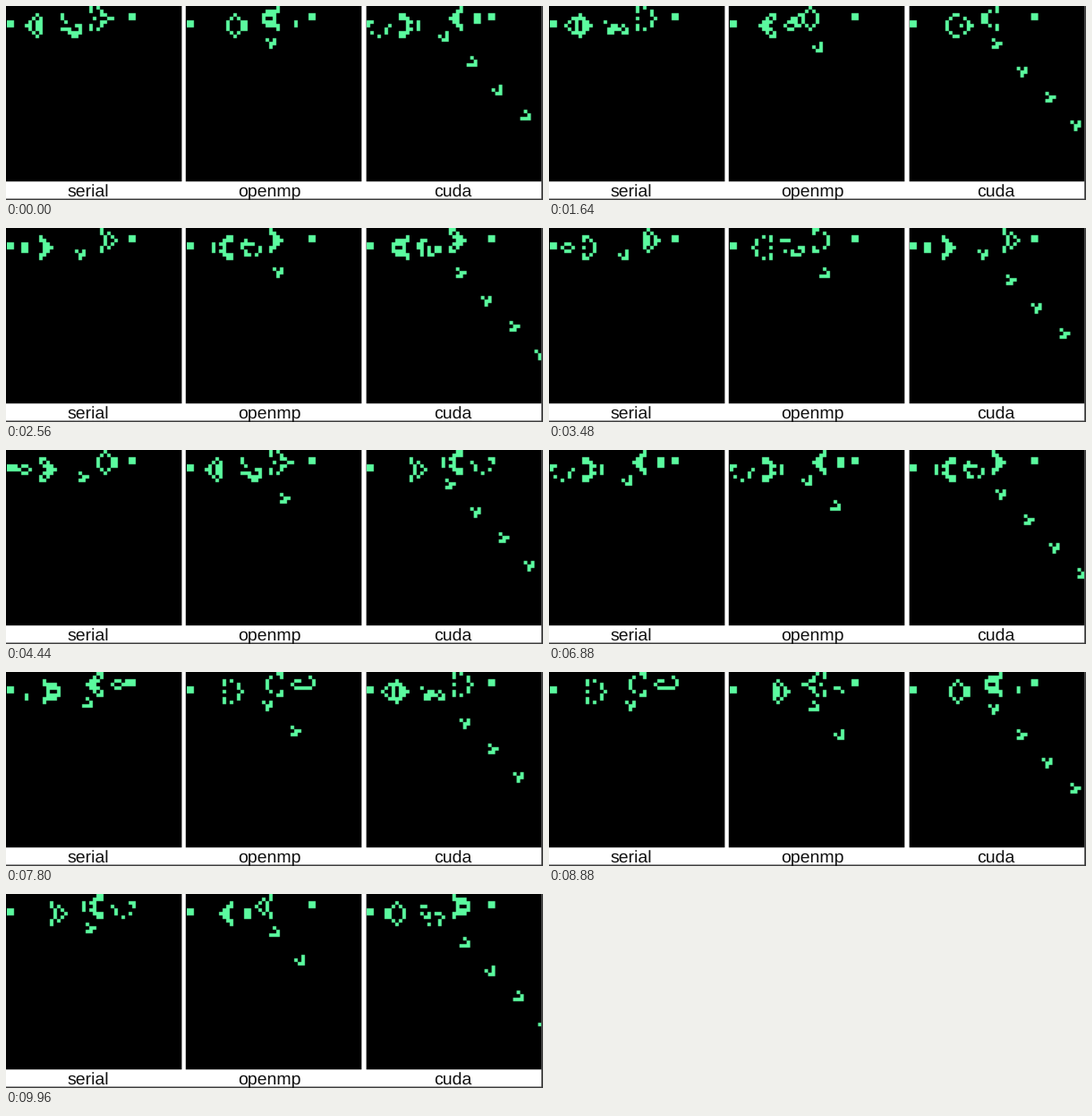
A matplotlib script for the animation above (10000 ms loop, 600x217 px).

```python
import numpy as np
import matplotlib.pyplot as plt
from matplotlib.animation import FuncAnimation
from matplotlib.colors import LinearSegmentedColormap
from matplotlib.patches import Rectangle

plt.rcParams["text.hinting"] = "none"

W, H, DPI = 600, 217, 100
FRAMES, INTERVAL = 250, 40
CELLS, CELL = 49, 3.985
PAD, WORLD = 2, 96
FLOOR = 196.3
GREEN, EDGE = "#5bfa9f", "#3c3c3c"

# Glider gun: row -> live columns
GUN = {
    0: [24],
    1: [22, 24],
    2: [12, 13, 20, 21, 34, 35],
    3: [11, 15, 20, 21, 34, 35],
    4: [0, 1, 10, 16, 20, 21],
    5: [0, 1, 10, 14, 16, 17, 22, 24],
    6: [10, 16, 24],
    7: [11, 15],
    8: [12, 13],
}


def step(world):
    total = sum(np.roll(world, (dy, dx), (0, 1))
                for dy in (-1, 0, 1) for dx in (-1, 0, 1))
    return ((total == 3) | ((world == 1) & (total == 4))).astype(np.uint8)


def run(count):
    world = np.zeros((WORLD, WORLD), np.uint8)
    for row, cols in GUN.items():
        world[row + PAD, np.array(cols) + PAD] = 1
    views = []
    for _ in range(count):
        view = world[PAD:PAD + CELLS, PAD:PAD + CELLS]
        # Three samples per cell keep the smoothed edges narrow
        views.append(np.kron(view, np.ones((3, 3))))
        world = step(world)
    return views


def serial_gen(n):
    return int(12.6 + 0.054 * n)


def openmp_gen(n):
    return int(28.08 + 0.134 * n)


def cuda_gen(n):
    # The visible area repeats every 30 generations once it is filled
    gen = int(np.interp(n, [0, 41, 249], [21.9, 90.7, 433.4]))
    return 150 + gen % 30


VIEWS = run(180)

# label, label centre, panel left, panel right, grid left, generation rule
PANELS = [
    ("serial", 92, 0, 196.4, 1.0, serial_gen),
    ("openmp", 294.3, 200.8, 397.3, 201.7, openmp_gen),
    ("cuda", 499.8, 402.6, 598.2, 403.4, cuda_gen),
]

fig = plt.figure(figsize=(W / DPI, H / DPI), dpi=DPI, facecolor="white")
ax = fig.add_axes([0, 0, 1, 1])
ax.axis("off")


def box(x, y, w, h, color):
    ax.add_patch(Rectangle((x, y), w, h, fc=color, lw=0, zorder=1,
                           snap=False))


box(0, 215.5, W, 1.5, EDGE)
box(598.2, 0, 1.8, H, EDGE)

cmap = LinearSegmentedColormap.from_list("cells", ["black", GREEN])
cmap.set_under((0, 0, 0, 0))
grids = []
for label, mid, left, right, x0, rule in PANELS:
    box(left, 0, right - left, FLOOR, "black")
    y0, size = 0.4, CELLS * CELL
    image = ax.imshow(VIEWS[0], cmap=cmap, vmin=0.01, vmax=1, aspect="auto",
                      interpolation="bilinear", zorder=2,
                      extent=(x0, x0 + size, y0 + size, y0))
    image.set_clip_path(Rectangle((left, 0), right - left, FLOOR,
                                  transform=ax.transData))
    ax.text(mid, 212.6, label, family="Liberation Sans", size=19.5 * 72 / DPI,
            color="#111111", ha="center", va="baseline", zorder=3)
    grids.append((image, rule))

ax.set_xlim(0, W)
ax.set_ylim(H, 0)


def draw(n):
    for image, rule in grids:
        image.set_data(VIEWS[rule(n)])
    return [image for image, _ in grids]


anim = FuncAnimation(fig, draw, frames=FRAMES, interval=INTERVAL,
                     init_func=lambda: draw(0), repeat=True, repeat_delay=0)
plt.show()
```
